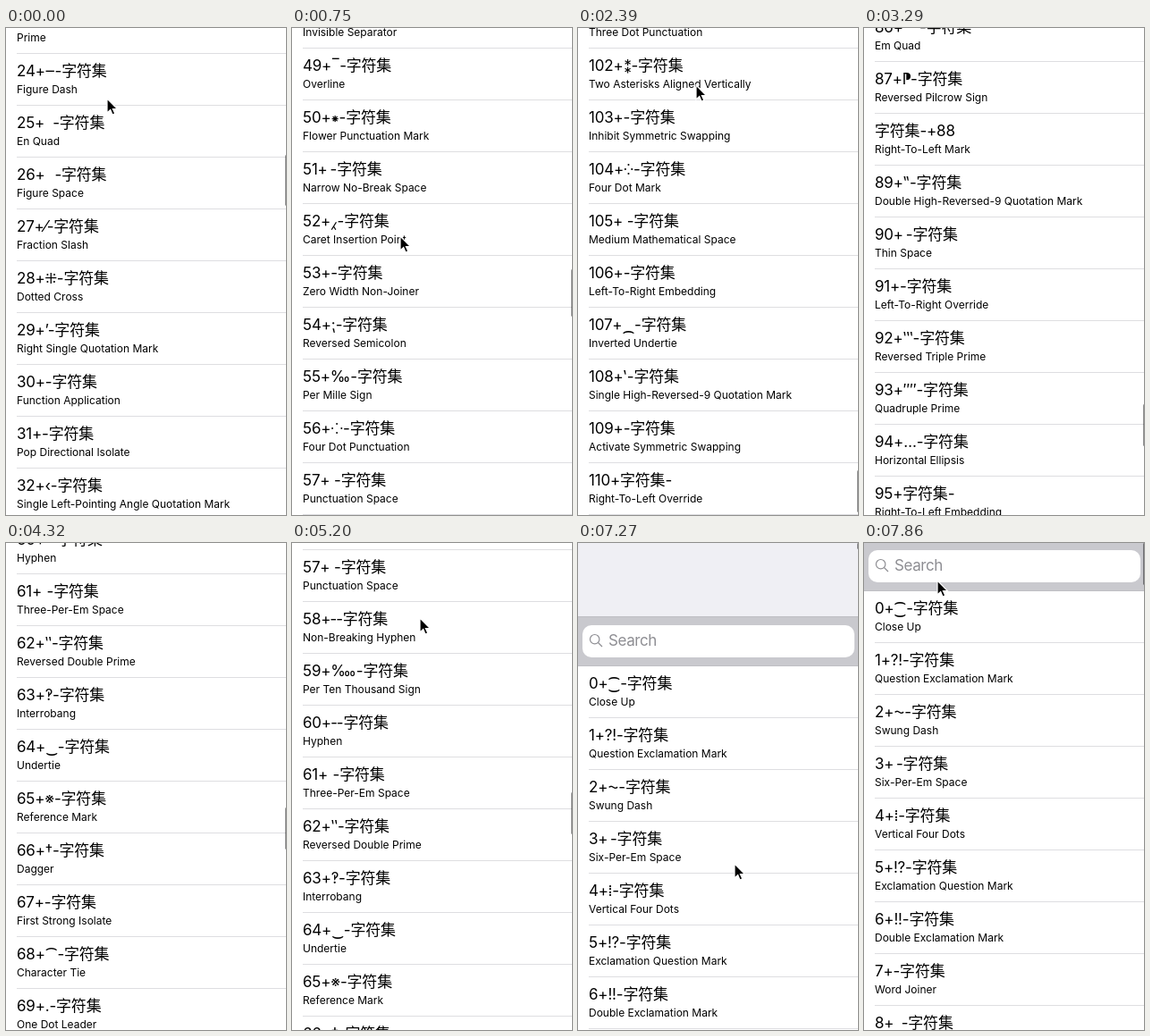
These frames come from a looping animation (313 px wide and 545 px high, 8000 ms). An HTML page:

```html
<!DOCTYPE html>
<html lang="zh-CN">
<head>
<meta charset="utf-8">
<title>Character list</title>
<style>
  html, body { margin: 0; width: 100%; height: 100%; overflow: hidden; background: #fff; }
  body {
    position: relative; color: #000;
    font-family: Inter, "Noto Sans", "DejaVu Sans", "Noto Sans CJK SC", "Noto Sans CJK", sans-serif;
    font-feature-settings: "calt" 0;
  }
  #stage { position: absolute; left: 0; top: 0; width: 313px; height: 545px; overflow: hidden; }
  #list { position: absolute; left: 0; top: 0; width: 313px; }
  .above { position: absolute; top: -356px; width: 313px; height: 300px; background: #efeff4; }
  .bar {
    position: absolute; top: -56px; width: 313px; height: 56px; box-sizing: border-box;
    background: #c9c9ce; border: solid #bfbfc4; border-width: 1px 0;
  }
  .field {
    position: absolute; left: 5px; top: 9px; width: 304px; height: 36px; border-radius: 10px;
    background: #fff; color: #8e8e93; font-size: 17px; line-height: 35px; letter-spacing: -.4px;
  }
  .field span { position: absolute; left: 29px; }
  .field svg { position: absolute; left: 7px; top: 9px; }
  .row { position: relative; height: 58px; white-space: pre; }
  .row::after {
    content: ""; position: absolute; left: 12px; right: 0; bottom: 0; height: 1px; background: #dedee1;
  }
  .row b, .row i { position: absolute; left: 12px; font-style: normal; font-weight: 400; }
  .row b { top: 0; font-size: 17px; line-height: 38px; letter-spacing: -.2px; }
  .row i { top: 32px; font-size: 12px; line-height: 16px; }
  #thumb { position: absolute; left: 311.5px; top: 0; width: 3px; border-radius: 2px; background: rgba(0, 0, 0, .45); }
  #cursor { position: absolute; left: -2px; top: -2px; }
</style>
</head>
<body>
<div id="stage">
  <div id="list">
    <div class="above"></div>
    <div class="bar"><div class="field">
      <svg width="18" height="18" fill="none" stroke="#8e8e93" stroke-width="1.2">
        <circle cx="6.7" cy="6.7" r="5.2"/><path d="M10.5 10.5 15 15"/>
      </svg>
      <span>Search</span>
    </div></div>
  </div>
  <div id="thumb"></div>
  <svg id="cursor" width="18" height="24">
    <path d="M2 2V18L5.7 14.6 8 20 10.8 18.8 8.4 13.6H13.4Z" stroke="#fff" stroke-width="1.2"/>
  </svg>
</div>
<script>
// One row per line: glyph|name
const ROWS = `⁐|Close Up
?!|Question Exclamation Mark
⁓|Swung Dash
\u2006|Six-Per-Em Space
⁞|Vertical Four Dots
!?|Exclamation Question Mark
!!|Double Exclamation Mark
|Word Joiner
\u2002|En Space
–|En Dash
|Zero Width Joiner
•|Bullet
‴|Triple Prime
⁙|Five Dot Punctuation
|Nominal Digit Shapes
‥|Two Dot Leader
⁍|Black Rightwards Bullet
⁅|Left Square Bracket With Quill
„|Double Low-9 Quotation Mark
|Left-To-Right Isolate
⁊|Tironian Sign Et
|Zero Width Space
—|Em Dash
′|Prime
‒|Figure Dash
\u2000|En Quad
\u2007|Figure Space
⁄|Fraction Slash
⁜|Dotted Cross
’|Right Single Quotation Mark
|Function Application
|Pop Directional Isolate
‹|Single Left-Pointing Angle Quotation Mark
\u200a|Hair Space
‖|Double Vertical Line
|Invisible Times
‘|Left Single Quotation Mark
‡|Double Dagger
|Line Separator
⁂|Asterism
‣|Triangular Bullet
|Left-To-Right Mark
⁎|Low Asterisk
″|Double Prime
|National Digit Shapes
⁇|Double Question Mark
‚|Single Low-9 Quotation Mark
⁆|Right Square Bracket With Quill
|Invisible Separator
‾|Overline
⁕|Flower Punctuation Mark
\u202f|Narrow No-Break Space
⁁|Caret Insertion Point
|Zero Width Non-Joiner
⁏|Reversed Semicolon
‰|Per Mille Sign
⁘|Four Dot Punctuation
\u2008|Punctuation Space
‑|Non-Breaking Hyphen
‱|Per Ten Thousand Sign
‐|Hyphen
\u2004|Three-Per-Em Space
‶|Reversed Double Prime
‽|Interrobang
‿|Undertie
※|Reference Mark
†|Dagger
|First Strong Isolate
⁀|Character Tie
․|One Dot Leader
|Invisible Plus
“|Left Double Quotation Mark
⁃|Hyphen Bullet
⁒|Commercial Minus Sign
›|Single Right-Pointing Angle Quotation Mark
\u2005|Four-Per-Em Space
|Inhibit Arabic Form Shaping
|Pop Directional Formatting
”|Right Double Quotation Mark
‸|Caret
\u2003|Em Space
‗|Double Low Line
⁝|Tricolon
|Activate Arabic Form Shaping
⁚|Two Dot Punctuation
―|Horizontal Bar
\u2001|Em Quad
⁋|Reversed Pilcrow Sign
|Right-To-Left Mark
‟|Double High-Reversed-9 Quotation Mark
\u2009|Thin Space
|Left-To-Right Override
‷|Reversed Triple Prime
⁗|Quadruple Prime
…|Horizontal Ellipsis
|Right-To-Left Embedding
‵|Reversed Prime
|Paragraph Separator
⁌|Black Leftwards Bullet
‧|Hyphenation Point
|Right-To-Left Isolate
⁖|Three Dot Punctuation
⁑|Two Asterisks Aligned Vertically
|Inhibit Symmetric Swapping
⁛|Four Dot Mark
\u205f|Medium Mathematical Space
|Left-To-Right Embedding
⁔|Inverted Undertie
‛|Single High-Reversed-9 Quotation Mark
|Activate Symmetric Swapping
|Right-To-Left Override`.split('\n').map(line => line.split('|'));

const LOOP = 8000, TICKS = 54;
const VIEW = 545, ROW = 58, HEADER = 54;
const BOTTOM = HEADER + ROWS.length * ROW - VIEW, BOTTOM_TICK = 15;

// Key points as [tick, value]: two flicks down, a rest, two flicks up, a pull past the top.
const scrollAt = smoothPath([
  [0, 1417], [10, 4357], [BOTTOM_TICK, BOTTOM], [19, BOTTOM], [22, 5062], [30, 3480],
  [35, 3352], [40, 804], [42.5, -90], [46, 0], [49, -84], [52, 0], [TICKS, 0]
]);
const pointerX = smoothPath([[0, 113], [10, 128], [35, 143], [49, 175], [53, 82], [TICKS, 82]]);
const pointerY = smoothPath([
  [0, 79], [10, 325], [14, -30], [22, 570], [30, 570], [35, 84], [38, 570],
  [45, 570], [47, 190], [49, 359], [53, 42], [TICKS, 42]
]);

// Cubic curve through the points that never overshoots them.
function smoothPath(points) {
  const slopes = points.slice(1).map(([x, y], k) => (y - points[k][1]) / (x - points[k][0]));
  const tangent = k => {
    const before = slopes[k - 1] ?? slopes[k], after = slopes[k] ?? before;
    return before * after > 0 ? 2 * before * after / (before + after) : 0;
  };
  return x => {
    let k = 0;
    while (k < slopes.length - 1 && x >= points[k + 1][0]) k++;
    const [x0, y0] = points[k], [x1, y1] = points[k + 1];
    const span = x1 - x0, u = (x - x0) / span, v = 1 - u;
    return y0 * v * v * (1 + 2 * u) + y1 * u * u * (3 - 2 * u)
      + span * u * v * (tangent(k) * v - tangent(k + 1) * u);
  };
}

function titleOf(glyph, name, n) {
  if (name === 'Right-To-Left Mark') return `字符集-+${n}`;
  if (name.startsWith('Right-To-Left')) return `${n}+字符集-`;
  return `${n}+${glyph}-字符集`;
}

const list = document.getElementById('list');
const thumb = document.getElementById('thumb');
const cursor = document.getElementById('cursor');

ROWS.forEach(([glyph, name], n) => {
  const row = document.createElement('div');
  const title = document.createElement('b');
  const subtitle = document.createElement('i');
  row.className = 'row';
  title.textContent = titleOf(glyph, name, n);
  subtitle.textContent = name;
  row.append(title, subtitle);
  list.append(row);
});

function place(el, x, y) {
  el.style.transform = `translate(${Math.round(x)}px, ${Math.round(y)}px)`;
}

function draw(tick) {
  const scroll = scrollAt(tick);
  place(list, 0, HEADER - scroll);
  place(cursor, pointerX(tick), pointerY(tick));

  // Rows not reached yet count as 44px high, so the thumb shrinks on the way down.
  const seen = Math.floor((VIEW - HEADER + scroll) / ROW);
  const unseen = tick < BOTTOM_TICK ? ROWS.length - 1 - seen : 0;
  const content = HEADER + ROWS.length * ROW - unseen * (ROW - 44);
  const size = VIEW * VIEW / content + 1.5;
  const top = Math.max(0, scroll) * (VIEW - 3 - size) / (content - VIEW);
  thumb.style.height = Math.max(7, Math.round(size + Math.min(0, scroll))) + 'px';
  place(thumb, 0, top);
}

const begin = performance.now();
function animate() {
  const t = (performance.now() - begin) % LOOP;
  draw(Math.floor(t * TICKS / LOOP));
  requestAnimationFrame(animate);
}
animate();
</script>
</body>
</html>
```
